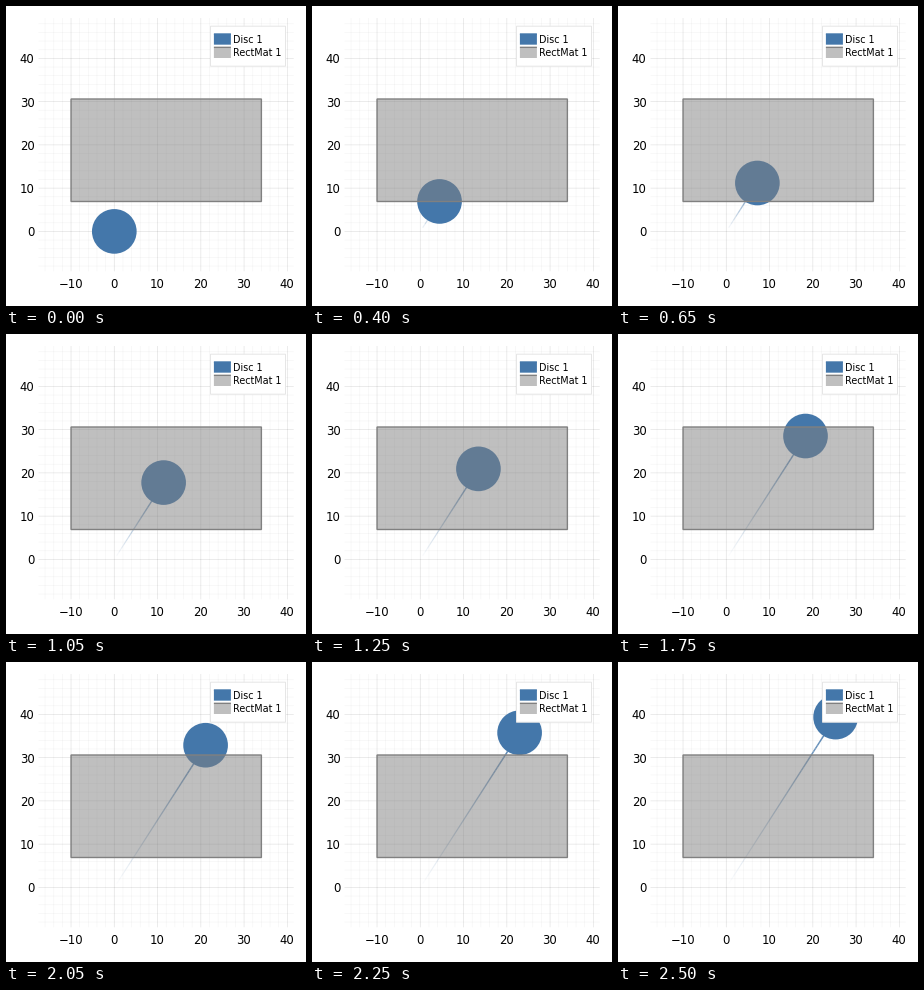
Recreate the animation shown at these times as a matplotlib script. Size 300 by 300 pixels, loop 2550 ms.

```python
import numpy as np
import matplotlib.pyplot as plt
from matplotlib.animation import FuncAnimation
from matplotlib.collections import LineCollection
from matplotlib.colors import to_rgb
from matplotlib.patches import Circle, Rectangle

SIZE, DPI = 300, 100
PT = 72 / DPI                      # points per pixel
FRAMES, STEP_MS = 51, 50
BLUE, GREY = "#4477AA", "#808080"

SCALE = 4.326                      # pixels per data unit
X0, Y0 = 108.3, 225.4              # pixel position of the data origin
LEFT, RIGHT, TOP, BOTTOM = 32.5, 287.7, 12, 265.3
STROKE = 1.39                      # outline width in pixels
RADIUS = 5 * SCALE + STROKE / 2

# Motion along a straight line, slowed down while crossing the mat
HEADING = np.array([np.cos(1.0), -np.sin(1.0)])
ENTER, LEAVE = 7.8, 37.8
SPEED, DRAG = 4.45, 0.0247


def px(x):
    return X0 + SCALE * x


def py(y):
    return Y0 - SCALE * y


def position(frame):
    inside = np.clip(frame - ENTER, 0, LEAVE - ENTER)
    after = max(frame - LEAVE, 0)
    slow = DRAG * inside ** 2 / 2 + DRAG * inside * after
    return np.array([X0, Y0]) + (SPEED * frame - slow) * HEADING


plt.rcParams["font.family"] = "DejaVu Sans"
fig = plt.figure(figsize=(SIZE / DPI, SIZE / DPI), dpi=DPI, facecolor="white")
ax = fig.add_axes([0, 0, 1, 1])
ax.set_xlim(0, SIZE)
ax.set_ylim(SIZE, 0)
ax.axis("off")


def line(xs, ys, width, z, **style):
    ax.plot(xs, ys, lw=width * PT, zorder=z, snap=False,
            solid_capstyle="butt", **style)


def grid(step, alpha):
    for v in range(-50, 51, step):
        if LEFT <= px(v) <= RIGHT:
            line([px(v)] * 2, [TOP, BOTTOM], 0.7, 0, color="black", alpha=alpha)
        if TOP <= py(v) <= BOTTOM:
            line([LEFT, RIGHT], [py(v)] * 2, 0.7, 0, color="black", alpha=alpha)


def label(x, y, text, size, ha, z=1):
    ax.text(x, y, text, fontsize=size * PT, ha=ha, va="center_baseline",
            color="black", zorder=z)


def box(x, y, w, h, z, **style):
    ax.add_patch(Rectangle((x, y), w, h, zorder=z, snap=False, **style))


grid(2, 0.04)
grid(10, 0.07)
for v in range(-10, 41, 10):
    label(px(v) - 0.2, 277, str(v).replace("-", "\u2212"), 11.6, "center")
    if v >= 0:
        label(28.6, py(v), str(v), 11.6, "right")

# Mat lies translucent over the disc and its trail
mat = (px(-10), 93, 44 * SCALE, 102.5)
box(*mat, 4, facecolor=GREY, alpha=0.5, lw=0)
box(*mat, 5, fill=False, edgecolor=GREY, lw=STROKE * PT)

# Legend
ROW = 40 / 3
box(204.5, 20.2, 75, 3 * ROW, 6, facecolor="white", edgecolor="#e6e6e6", lw=PT)
for row, (name, color, alpha) in enumerate([("Disc 1", BLUE, 1),
                                            ("RectMat 1", GREY, 0.5)], 1):
    mid = 20 + row * ROW
    top = mid - 0.4 * ROW
    box(207.9, top, 17, 0.8 * ROW, 7, facecolor=color, alpha=alpha, lw=0)
    line([207.9, 224.9], [top, top], STROKE, 8, color=color)
    label(226.7, mid - 0.2, name, 9.6, "left", 8)

trail = LineCollection([], zorder=2, capstyle="butt")
ax.add_collection(trail, autolim=False)
disc = Circle((X0, Y0), RADIUS, facecolor=BLUE, lw=0, zorder=3)
ax.add_patch(disc)


def draw(frame):
    path = np.array([position(i) for i in range(frame + 1)])
    disc.center = path[-1]
    # Trail grows wider and more opaque towards the disc
    ramp = np.arange(frame) / max(frame, 1)
    trail.set_segments(list(zip(path[:-1], path[1:])))
    trail.set_linewidths((1 + 0.6 * ramp) * PT if frame else [0])
    trail.set_color([(*to_rgb(BLUE), a) for a in ramp] if frame else "none")
    return trail, disc


anim = FuncAnimation(fig, draw, frames=FRAMES, interval=STEP_MS,
                     repeat=True, repeat_delay=0)
plt.show()
```
